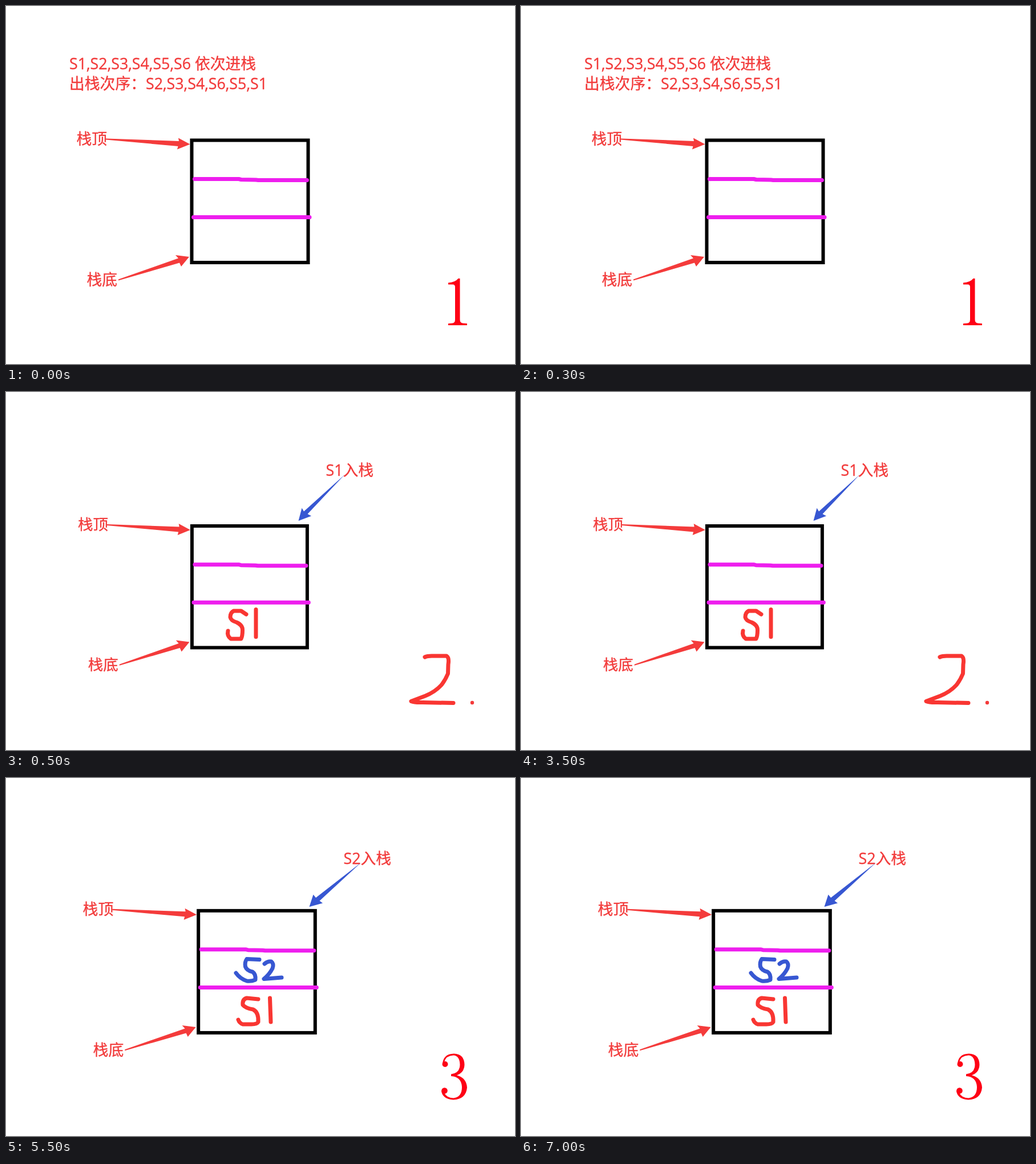
An HTML page that plays this animation: 892 px wide and 628 px high, repeating every 8000 ms.

```html
<!DOCTYPE html>
<html lang="zh">
<head>
<meta charset="utf-8">
<title>进栈</title>
<style>
html, body { margin: 0; width: 100%; height: 100%; overflow: hidden; background: #fff; }
svg { display: block; width: 892px; height: 628px; }
text { font: 26.8px "Open Sans", "Noto Sans CJK SC", "Noto Sans CJK", sans-serif; fill: #f23b3b; stroke: #f23b3b; stroke-width: .35px; white-space: pre; }
.digit { fill: #fe0015; }
.pen { fill: none; stroke: #f93632; stroke-width: 7; stroke-linecap: round; stroke-linejoin: round; }
.blue { stroke: #3757d2; }
.magenta { stroke: #ee1eee; }
.arrow { fill: #f43b3b; }
.push { fill: #3757d2; }
.scene { visibility: hidden; animation: 8s step-end infinite; }
#start { animation-name: start; }
#push1 { animation-name: push1; }
#push2 { animation-name: push2; }
@keyframes start { 0% { visibility: visible } 6.25%, 100% { visibility: hidden } }
@keyframes push1 { 0% { visibility: hidden } 6.25% { visibility: visible } 68.75%, 100% { visibility: hidden } }
@keyframes push2 { 0% { visibility: hidden } 68.75%, 100% { visibility: visible } }
</style>
</head>
<body>
<svg viewBox="0 0 892 628">
  <defs>
    <g id="stack">
      <rect x="325.5" y="235.5" width="204" height="214.5" fill="none" stroke="#000" stroke-width="6"/>
      <path class="pen magenta" d="M330.5 303.5H408L412 304.5 438 305 442 305.5H527.5M328.5 370.5H532"/>
      <text x="123.5" y="243">栈顶</text>
      <text x="141.5" y="490">栈底</text>
      <path class="arrow" d="M175 232.5 303 237 302 231.5 322.5 242.5 300 251.5 301.5 246 175 234.5Z"/>
      <path class="arrow" d="M197 479.5 302 442.5 297 437 321 440 307 457 304 450.5 197 481.5Z"/>
    </g>
  </defs>

  <g id="start" class="scene">
    <text x="111" y="110.5">S1,S2,S3,S4,S5,S6 依次进栈</text>
    <text x="111" y="146">出栈次序：S2,S3,S4,S6,S5,S1</text>
    <use href="#stack"/>
    <path class="digit" role="img" aria-label="1" d="M775 485.5Q787 485 792.5 478H795.5V550Q795.500 556 801 556.5L808 557V560H775V557L782 556.5Q787 556 787 550V493Q787 488.500 783 488.5H775Z"/>
  </g>

  <g id="push1" class="scene">
    <use href="#stack" transform="matrix(.99 0 0 .995 3.7 .7)"/>
    <text x="560.5" y="147">S1入栈</text>
    <path class="push" d="M593.5 145 522 209.5 518.5 203.5 512.5 226 535 217.5 528.5 214Z"/>
    <path class="pen" d="M421 390 412 384H399Q393 387 393 395 394 401 404 404 415 409 414.5 418 414.5 428 412 433H394Q387 428 389 419M438 381.5V429.5"/>
    <path class="pen" d="M734 465Q738 463 746 463H772Q777 466 775 478L774.5 494Q770 505 763 514 752 526 735 533L710 542.5Q716 545 730 544.5L784 545.5"/>
    <circle class="arrow" cx="817" cy="545" r="3.2"/>
  </g>

  <g id="push2" class="scene">
    <use href="#stack" transform="matrix(1.003 0 0 .998 10.7 -2.2)"/>
    <text x="591.5" y="150.5">S2入栈</text>
    <path class="push" d="M622 148.5 543 210 538.5 204.500 531.5 226 555 219.500 549.500 215.500Z"/>
    <path class="pen blue" d="M444 318.5 422 317.5Q418 323 419.5 331 422 338 432 340 438 344 437 354 430 357 422 356 410 352 403 342M453 326Q459 321 465 322 470 326 467 334 462 344 452 352.5L483 350"/>
    <path class="pen" d="M442 388 422 386Q414 388 415 398 420 404 433 406 443 411 442 428 440 432 430 432H415Q409 430 407 424M462.5 386 464 428"/>
    <g class="digit" role="img" aria-label="3">
      <path d="M765 502Q766 484 785 483.500 803 484 803.500 503 803 517 790 521.500 807 526 808 543 806 563.500 784 564.500 764 563 763 548L768 552Q772 561 784 561.500 799 560 799 542 798 524 780 523V519.500Q795 518 795.500 503 795 487 784 486.500 771 487 768 498Z"/>
      <circle cx="769.5" cy="502" r="5"/>
      <circle cx="768.5" cy="548.5" r="5.3"/>
    </g>
  </g>
</svg>
</body>
</html>
```
